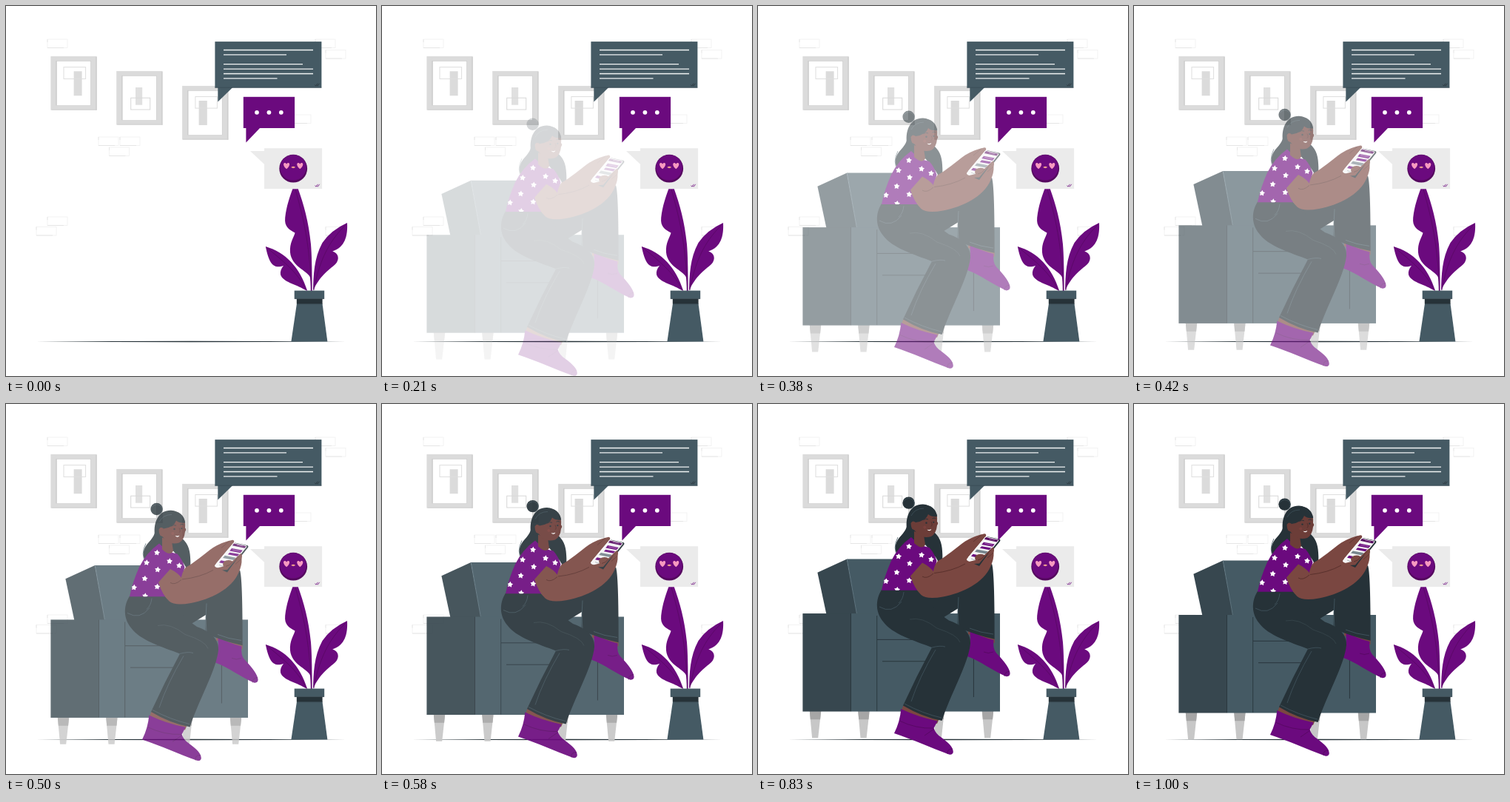
Animation of 500 by 500 pixels, one loop 1.04 s. Source, as an HTML page with a canvas:

```html
<!DOCTYPE html>
<html lang="en">
<head>
<meta charset="utf-8">
<title>Chatting at home</title>
<style>
html, body { margin: 0; width: 100%; height: 100%; overflow: hidden; background: #fff; }
canvas { display: block; width: 500px; height: 500px; }
</style>
</head>
<body>
<canvas id="stage"></canvas>
<script>
const SIZE = 500, LOOP = 1040, FRAME = 1000 / 24, RISE = 30;
const PURPLE = '#6b0a7e', DEEP = '#55085f', SLATE = '#455a64', DARK = '#37474f',
      INK = '#263238', SKIN = '#7a4741', FACE = '#6c3d38', PALE = '#ebebeb', GREY = '#dbdbdb';

const stage = document.getElementById('stage');
const layer = document.createElement('canvas');
const ratio = window.devicePixelRatio || 1;
for (const c of [stage, layer]) c.width = c.height = Math.round(SIZE * ratio);
const view = stage.getContext('2d');
const sheet = layer.getContext('2d');
let g = view;

function fill(d, color) {
  g.fillStyle = color;
  g.fill(new Path2D(d));
}

function line(d, color, width = 1) {
  g.strokeStyle = color;
  g.lineWidth = width;
  g.stroke(new Path2D(d));
}

function box(x, y, w, h, color) {
  g.fillStyle = color;
  g.fillRect(x, y, w, h);
}

function frame(x, y, w, h, color, width = 1) {
  g.strokeStyle = color;
  g.lineWidth = width;
  g.strokeRect(x, y, w, h);
}

function disc(x, y, r, color) {
  g.fillStyle = color;
  g.beginPath();
  g.arc(x, y, r, 0, Math.PI * 2);
  g.fill();
}

function star(x, y, r) {
  g.fillStyle = '#fff';
  g.beginPath();
  for (let i = 0; i < 10; i++) {
    const a = i * Math.PI / 5 - 1.45, d = i % 2 ? r * 0.55 : r;
    g.lineTo(x + d * Math.cos(a), y + d * Math.sin(a));
  }
  g.fill();
}

function heart(x, y) {
  fill(`M${x} ${y + 4.6}C${x - 7} ${y - 1} ${x - 3.5} ${y - 6.5} ${x} ${y - 2.2}` +
       `C${x + 3.5} ${y - 6.5} ${x + 7} ${y - 1} ${x} ${y + 4.6}Z`, '#f79ac0');
}

function ticks(x, y, color) {
  line(`M${x} ${y}l1.3 1.6 2.5-3.4M${x + 2.8} ${y + .8}l.8.8 2.5-3.4`, color, .8);
}

function picture(x, y) {
  box(x, y, 62.3, 72.7, GREY);
  box(x + 60.8, y + 1, 1.5, 71.7, '#cfcfcf');
  box(x + 1, y + 71.6, 61.3, 1.1, '#d1d1d1');
  box(x + 7, y + 6, 47.3, 60.4, '#cbcbcb');
  box(x + 8.4, y + 6.8, 45.4, 59.4, '#fff');
}

function wall() {
  const bricks = [[56, 45], [418, 45], [432, 59.5], [125, 177], [154, 177], [139.5, 191],
                  [56, 285], [41, 298.5], [385, 147], [432, 298.5]];
  for (const [x, y] of bricks) {
    frame(x, y, 27, 11.5, '#f2f2f2', .9);
    line(`M${x} ${y + 11.5}h22M${x} ${y}v4`, '#e0e0e0', .7);
  }
  picture(60.4, 67.9);
  box(91.6, 88.2, 11, 33, GREY);
  frame(78, 82.6, 29.6, 15.8, '#dedede');
  picture(149.2, 87.9);
  box(175, 110, 9.2, 23.7, '#e0e0e0');
  frame(168.7, 124.2, 26, 15.8, '#d8d8d8');
  picture(238.1, 107.9);
  box(260.6, 128, 11.2, 33, GREY);
  frame(255.9, 122.5, 29.5, 15.6, '#dedede');
}

function bubbles() {
  fill('M286.3 110V129.4L306.3 110Z', SLATE);
  box(282.4, 48.1, 144, 62.4, SLATE);
  line('M282.4 110.2H426.4', DARK, .7);
  const ends = [415, 379, 0, 401, 415, 415, 366.5];
  ends.forEach((end, i) => {
    if (end) line(`M294 ${59.5 + 6.4 * i}H${end}`, '#f0f2f3', 1.3);
  });
  ticks(417.3, 106.5, INK);

  fill('M324.4 164V184.4L344 164Z', PURPLE);
  box(320.8, 122.8, 69.3, 42.2, PURPLE);
  for (const x of [339, 355.4, 371.8]) disc(x, 143.8, 2.9, '#fff');

  fill('M330 196H350V214.8Z', PALE);
  box(349, 192.2, 78.1, 54.9, PALE);
  disc(388.2, 219.7, 18.9, DEEP);
  g.save();
  g.beginPath();
  g.arc(388.2, 219.7, 18.4, 0, Math.PI * 2);
  g.clip();
  disc(388, 217.8, 17.8, PURPLE);
  g.restore();
  heart(379.1, 215.7);
  heart(397.3, 215.7);
  fill('M385.2 218Q388.2 215.6 391.2 218Q388.2 220.3 385.2 218Z', '#f0a08c');
  ticks(417.6, 242.6, PURPLE);
}

function plant() {
  fill('M387.3 247.2H394.8C402 267 409 291 412 322Q413.6 341 413.6 385H411.8' +
       'Q412 371 410.7 366C406 357 386 352 384 333C383 320 389 313 390.5 306.5' +
       'C382 302 376 298 377.2 286C379 270 383.5 258 387.3 247.2Z', PURPLE);
  line('M391 248C399 276 411 318 412.5 385', DEEP, .7);
  fill('M461 293C462 311 458 326 441.2 331.5C450 334 451 343 445 349C436 357 427 362 416.6 381' +
       'L415 385C415.5 364 416 341 427.5 320Q439 303 461 293Z', PURPLE);
  line('M460 295C440 314 424 339 416 384', DEEP, .7);
  fill('M350.8 325C378 333 397 353 407.2 385L403 383C392 376 374 373 371 363' +
       'Q370 357 375 351C362 355 356 350 350.8 325Z', PURPLE);
  line('M352 326C374 345 393 358 406 384', DEEP, .7);
  fill('M393 402H427.5L434.4 453.5H385.4Z', SLATE);
  box(392.8, 395.5, 34.8, 7, INK);
  box(389.7, 384.6, 40.5, 11.2, SLATE);
  line('M390 395.6H430M393 402.7H427.5', DARK, .7);
}

function floor() {
  fill('M41 453.5Q250 451.9 459 453.5Q250 455 41 453.5Z', INK);
}

function sofa() {
  for (const x of [69.8, 135.2, 236.5, 302.8]) {
    fill(`M${x} 417H${x + 15.4}L${x + 11.4} 453.3H${x + 3.3}Z`, '#c7c7c7');
    fill(`M${x} 417H${x + 15.4}L${x + 14.3} 428.3H${x + 1}Z`, '#a6a6a6');
  }
  fill('M120 211.5H215L240 286H133Z', SLATE);
  fill('M80.4 229.7L120.2 211.5L134 286H92.4Z', DARK);
  line('M120.3 212L133.4 285', '#78909c', .6);
  box(125, 285, 202, 132.5, SLATE);
  box(60.4, 285, 65, 132.5, DARK);
  line('M125.5 285V417M160.7 288V417', INK, .8);
  line('M161 320.3H226M168 349.7H232M291.4 312V398', INK, .9);
}

function boots() {
  fill('M284 305L319.6 318V325L284 313Z', SKIN);
  fill('M286.5 308.5Q302 317 318.5 321Q317 333 322 338.5Q340 357 340.6 366' +
       'Q340.5 370.3 335.5 370.3C318 363 300 349 282.8 343Q288 330 286.5 308.5Z', PURPLE);
  line('M318 337Q311 340 305 337M340 363Q333 364 333 370', DEEP, .8);
  fill('M197 408L245 427L242 434L193 418Z', SKIN);
  fill('M193.3 414Q216 425 242.6 430.4L237.6 440Q240 447.5 247 452' +
       'C258 460 264 466 263.8 472.5Q263 476.5 258 475.4C234 467 209 455 184 447Q192 431 193.3 414Z', PURPLE);
  line('M191 430Q214 441 237 440M238 441L225 450M263 468Q255 468 256 475', DEEP, .8);
}

function trousers() {
  fill('M218 254L268 252L316 218Q319.8 228 319.6 319.7Q296 315 269.5 303.5L270 278.5L248 292Z', INK);
  line('M271 263Q269 283 271 303M318 313Q300 311 286 305', SLATE, .8);
  fill('M167 253H221Q236 280 258 294.5C276 301 288 311 287 326C284 354 260 394 248.6 430' +
       'Q222 425 196 409.5Q214 370 235 331C212 322 181 313 169 296C157 281 160 264 167 253Z', INK);
  line('M205 293Q222 289 242 305Q270 314 273 324', '#3a494f', .7);
  line('M235 331Q246 328 253 330M240 334Q218 371 207 404M198 407Q222 420 248 426', SLATE, .7);
  line('M164 276Q181 286 194 269M197 256Q196 266 190 271', SLATE, .7);
}

function backHair() {
  fill('M202 160C202 179 186 180 185.5 197Q186 205 193 212L226 192L240 209Q246 217 245 228' +
       'Q250 220 249.3 206C249 192 247 184 239 176L224 160Z', INK);
  line('M189 182Q181.5 197 189 208', SLATE, .8);
}

function shirt() {
  const body = 'M207 182Q218 194 231.5 196Q238 203 241.5 214L238 229L218 253.8H167' +
               'Q171 234 180 214Q190 194 207 182Z';
  fill(body, PURPLE);
  const stars = [[204, 194.5], [221, 206], [205, 217.5], [187.5, 229.5], [204.3, 240.5], [173, 241.5],
                 [188, 253], [234, 212], [218, 252], [190, 208]];
  g.save();
  g.clip(new Path2D(body));
  for (const [x, y] of stars) star(x, y, 4.2);
  g.restore();
}

function head() {
  fill('M211 174V190Q222 200 226 192L224 179Z', FACE);
  disc(203.6, 135.6, 8.2, INK);
  line('M197 133Q203 126 210 132Q213 139 207 143', SLATE, .6);
  fill('M206 154C209 139 228 133 238 145Q243 151 242 161Q244.4 163 242 166' +
       'Q241 177 234 181Q224 184 216 178L211 172Q205 171 206 162Z', FACE);
  fill('M201 170C199 152 207 137 223 137.4Q240 139 242.2 154Q235 155 230 151' +
       'Q227 160 213 162Q207 158 207 166L209 176Q205 175 201 170Z', INK);
  line('M207 153Q212 143 224 143', SLATE, .6);
  fill('M206.5 163Q210 157.5 213.5 164V173Q206.5 172 206.5 163Z', FACE);
  line('M223.5 158.6Q226.5 156 230 157.8M235.5 156.7Q238 155 240.3 156.9', INK, .9);
  disc(227.5, 162.6, 1.2, INK);
  disc(237.3, 161.7, 1.1, INK);
  line('M234 161Q236.5 166.2 233.7 167.4', '#4a2826', .7);
  fill('M228.6 171.4Q231.5 172.6 234.3 171Q233.6 173.6 231.2 173.2Q229.2 172.8 228.6 171.4Z', '#fff');
  disc(225.3, 168.5, 2.1, '#7a403c');
}

function phone() {
  fill('M309.5 181L326 184.5Q328.3 185.3 327 187.5L301 219.8Q299.5 221.6 297.2 220.6L285 215Z', INK);
  fill('M308.7 181.2L324.5 184.8Q326 185.6 325 187L299 219Q297.6 220.3 295.8 219.6' +
       'L283 213.8Q281.2 212.8 282.4 211L306.6 182Q307.6 180.8 308.7 181.2Z', '#f5f5f5');
  fill('M308 182L324.6 185.7L322.5 188.4L305.8 184.8Z', DEEP);
  line('M312 184L320 186', '#b88fc2', .7);
  fill('M305 188.6L319.7 191.4L316.8 194.8L302.2 192Z', PURPLE);
  fill('M302.2 194.2L315.2 196.4L312.7 199.2L299.8 196.8Z', PURPLE);
  line('M306 190.5L317 192.6', '#c4a0cc', .6);
  fill('M295.8 198.4L310.7 201.2L308 204.5L293 201.6Z', '#78868d');
  fill('M290.6 204.7L303.5 207.5L300.8 210.5L288 207.7Z', PURPLE);
  line('M288 211L296 214', '#9aa5ab', .8);
}

function arms() {
  fill('M236 232Q238 220 242.5 214.5C254 208.5 268 196 280 187.5Q292 180 306 177.2Q309 177.5 308 180.5' +
       'L284 209L294 214L270 226Z', SKIN);
  phone();
  fill('M222 216.5Q233 222 237.5 229Q265 226 281 216L294 213Q292 210 294.5 206.5Q300 203 306 206' +
       'L317 195.5Q320 196 318.5 203Q319 211 314.5 221C305 244 276 257.5 250 262.5' +
       'Q228 266.5 220.5 260Q211 251 206 234.5Z', SKIN);
  fill('M299 217.5L307 208L313 202L304 214L299 221L292 218Z', INK);
  line('M238 230.5Q262 228 280 218M306 207Q303 212 297 213M222 235Q228 239 237 231', '#512b28', .8);
  line('M302 178.5L291 188M315 199L309 205M318 203L310 210', '#512b28', .6);
}

function person() {
  boots();
  trousers();
  backHair();
  shirt();
  head();
  arms();
}

// y of cubic-bezier(.36, -.01, .5, 1.38) at x
function ease(x) {
  if (x >= 1) return 1;
  const at = (a, b, s) => 3 * (1 - s) * (1 - s) * s * a + 3 * (1 - s) * s * s * b + s * s * s;
  let lo = 0, hi = 1;
  for (let i = 0; i < 30; i++) {
    const mid = (lo + hi) / 2;
    if (at(.36, .5, mid) < x) lo = mid; else hi = mid;
  }
  return at(-.01, 1.38, lo);
}

function clear(ctx, dy) {
  ctx.setTransform(1, 0, 0, 1, 0, 0);
  ctx.clearRect(0, 0, stage.width, stage.height);
  ctx.setTransform(ratio, 0, 0, ratio, 0, dy * ratio);
}

function draw(now) {
  const step = Math.min(24, Math.floor((now % LOOP + 5) / FRAME));
  const p = step < 2 ? 0 : ease(step / 24 + .022);

  g = view;
  clear(g, 0);
  box(0, 0, SIZE, SIZE, '#fff');
  wall();
  floor();

  if (p > 0) {
    g = sheet;
    clear(g, RISE * (1 - p));
    sofa();
    person();
    g = view;
    g.globalAlpha = Math.min(1, p);
    g.drawImage(layer, 0, 0, SIZE, SIZE);
    g.globalAlpha = 1;
  }
  bubbles();
  plant();
}

let start;
function tick(now) {
  if (start === undefined) start = now;
  draw(now - start);
  requestAnimationFrame(tick);
}
draw(0);
requestAnimationFrame(tick);
</script>
</body>
</html>
```
